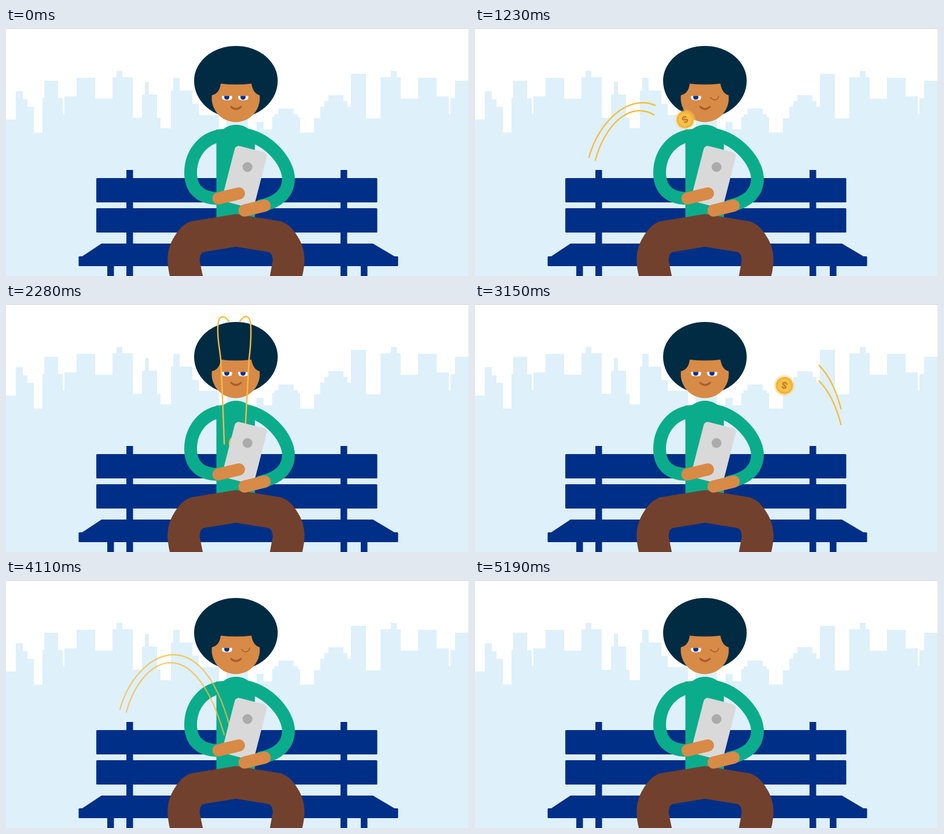
These frames come from a looping animation (800x428 px, 5.4 s). An HTML page:

```html
<!DOCTYPE html>
<html lang="en">
<head>
<meta charset="utf-8">
<title>Coins on a bench</title>
<style>
html, body { margin: 0; width: 100%; height: 100%; overflow: hidden; background: #fff; }
svg { display: block; width: 100vw; height: 100vh; }
.line { fill: none; stroke-linecap: round; }
.trail path { fill: none; stroke: #f8bc3c; stroke-width: 2.4; stroke-linecap: round; }
.coin text { font: bold 17px "Liberation Sans", Arial, sans-serif; text-anchor: middle; fill: #b9741f; }
</style>
</head>
<body>
<svg viewBox="0 0 800 428">
  <g fill="#def0fa">
    <path id="city"/>
    <!-- this block of towers stands at both ends of the skyline -->
    <path id="block" d="M63 181V121H66V91H90V121H98V149H101V118H122V86H154V122H184V85H191V74H201V85H219V181"/>
    <use href="#block" transform="translate(866) scale(-1 1)"/>
  </g>

  <g fill="#002f87">
    <path d="M208 245h11.500v183h-11.500zM578 245h11.500v183h-11.500zM175 410h11.500v18h-11.500zM613 410h11.500v18h-11.500z"/>
    <rect id="plank" x="156" y="259" width="485.500" height="42" rx="1.500"/>
    <use href="#plank" y="52"/>
    <path d="M165 372H634L672 394.500H131Z"/>
    <rect x="125.500" y="394" width="552" height="17" rx="1.500"/>
  </g>

  <path fill="#002b42" d="M325 91A72.200 60 0 0 1 469.500 91A72.200 64 0 0 1 325 91Z"/>
  <path fill="#d88a47" d="M371 96Q397 99 424 96Q427 113 438.200 116A41.500 41.500 0 1 1 355.800 116Q369 113 371 96Z"/>
  <g id="leftEye">
    <path fill="#fff" d="M373 117.300h17.500q1 3-1 6.200q-7 2.500-15 0q-2-3-1.500-6.200z"/>
    <path fill="#00308a" d="M377.300 117.300h8.400a4.600 4.600 0 1 1-8.400 0z"/>
  </g>
  <use id="rightEye" href="#leftEye" x="28"/>
  <path id="wink" class="line" stroke="#a35a2a" stroke-width="1.400" d="M407 119.500Q409 123 411 123Q414.500 125.500 417.500 123Q420.500 121.500 421 117.500"/>
  <path class="line" stroke="#a95f2d" stroke-width="3.300" d="M389 136Q397.500 143.500 406 136"/>

  <path fill="#0bac8b" d="M363.500 175H375C388 164.500 406 164.500 419 174L430 177V327H363.500Z"/>
  <g class="line" stroke="#0bac8b" stroke-width="22">
    <path d="M378 185C340 187 319 218 319 250C319 280 338 294 366 294"/>
    <path d="M414 184C455 192 488 232 488 260C488 285 470 301 440 307"/>
  </g>
  <path fill="#72412d" d="M283 428C277 402 278 384 288 365C297 349 307 337 321 333.500L397.500 321L474 333.500C488 337 498 349 507 365C517 384 518 402 512 428H456L461 401Q460 388 453 386.500L397.500 377.500L342 386.500Q335 388 334.500 401L340 428Z"/>

  <g id="flights"></g>

  <rect x="-28.500" y="-47.500" width="57" height="99" rx="7" fill="#d9d9d9" transform="translate(412.700 255) rotate(14.400)"/>
  <circle cx="417.300" cy="240" r="8.500" fill="#ababab"/>
  <path class="line" stroke="#d88a47" stroke-width="21" d="M367 294L402.500 285.500M412 315L447 306.500"/>
  <path fill="#ccc" d="M0 0H800V1H0Z"/>
  <path fill="#e6e6e6" d="M799 1H800V428H799Z"/>
</svg>
<script>
const $ = id => document.getElementById(id);
const clamp = v => Math.min(1, Math.max(0, v));
const ease = (t, [from, to, power = 1]) => clamp((t - from) / (to - from)) ** power;

// A tower of centred tiers, each lower one wider; it reaches down to the ground.
const box = (x, width, top) => `M${x} ${top}h${width}V428h${-width}z`;
const tower = (middle, width, top, tiers = 1) =>
  Array.from({ length: tiers }, (_, i) => box(middle - width / 2 - 7 * i, width + 14 * i, top + 10 * i)).join('');

$('city').setAttribute('d', [
  box(0, 800, 180.5), box(0, 48, 158), box(17, 12, 109), box(17, 20, 123), box(17, 31, 136),
  box(219, 48, 155), box(219, 149, 173), tower(248, 26, 115), tower(243.5, 7, 93),
  box(285, 37, 108), tower(294.5, 11, 86), box(322, 11, 131), box(333, 35, 150),
  box(381, 37, 155), box(433, 12, 162), box(433, 27, 175),
  tower(484, 26, 139, 2), box(460, 48, 154), tower(570, 26, 116, 3), box(532, 115, 156), tower(609, 26, 79)
].join(''));

// Time spans are [from, to, power] in ms within one round of three coins.
const arch = 'M632.5 181C613 108 580 89 558 89C520 89 470 140 432 205';
const flights = [
  { // from the right
    route: 'M631 214C610 154 580 137 556 137C525 137 470 168 427 219',
    lines: [arch, arch], drop: 27, halo: .45,
    grow: [60, 270], move: [60, 663, 1.9], draw: [300, 720, 1.5], fade: [750, 930]
  },
  { // from the left
    route: 'M190 206C212 178 228 163 244 150C300 100 375 130 408 245',
    lines: ['M197 223C222 130 335 55 388 258', 'M208 228C232 138 322 78 377 267'], drop: 0, halo: .3,
    grow: [770, 1120], move: [790, 1330, 1.86], draw: [975, 1370, 1.5], fade: [1400, 1560]
  },
  { // from above
    route: 'M391 -4V200L404 259',
    lines: ['M385 30C378 20 367 16 366 40C365 60 369 75 371 95C374 150 376 210 378 268',
      'M404 30C411 20 422 15 423 40C424 60 422 78 420 95C417 150 414 210 410 268'], drop: 0, halo: 0,
    grow: [1455, 1860], move: [1590, 2320, 1.3], draw: [1530, 2330, 1.65], fade: [2310, 2490]
  }
];

for (const f of flights) {
  $('flights').insertAdjacentHTML('beforeend', `<g>
    <g class="trail">${f.lines.map((d, i) =>
      `<path pathLength="1" d="${d}" transform="translate(0 ${i * f.drop})"/>`).join('')}</g>
    <g class="coin">
      <circle r="18" fill="#f8cf70" opacity="${f.halo}"/>
      <circle r="15" fill="#f5b93a"/>
      <circle r="12.300" fill="#f8c04a" stroke="#dc9a30" stroke-dasharray="1.500 1.500"/>
      <text y="6">$</text>
    </g></g>`);
  f.group = $('flights').lastElementChild;
  f.trail = f.group.querySelector('.trail');
  f.coin = f.group.querySelector('.coin');
  f.path = document.createElementNS('http://www.w3.org/2000/svg', 'path');
  f.path.setAttribute('d', f.route);
  f.length = f.path.getTotalLength();
}

const show = (el, on) => el.setAttribute('visibility', on ? 'visible' : 'hidden');

function render(time) {
  const loop = Math.floor(time % 5400 / 30) * 30;
  const t = loop < 2670 ? loop : loop - 2670;
  const winking = t >= 960 && t < 1680 || t >= 2400;
  show($('rightEye'), !winking);
  show($('wink'), winking);

  for (const f of flights) {
    const active = t > f.grow[0] && t < f.fade[1];
    show(f.group, active);
    if (!active) continue;
    const drawn = ease(t, f.draw);
    const p = f.path.getPointAtLength(f.length * ease(t, f.move));
    const spin = (t - 1050) * .9 - 10;
    f.trail.setAttribute('stroke-dasharray', `${drawn} 2`);
    f.trail.setAttribute('opacity', drawn > 0 ? 1 - ease(t, f.fade) : 0);
    f.coin.setAttribute('transform',
      `translate(${p.x} ${p.y}) rotate(${spin}) scale(${ease(t, f.grow)})`);
  }
}

const start = performance.now();
function tick() {
  render(performance.now() - start);
  requestAnimationFrame(tick);
}
tick();
</script>
</body>
</html>
```
